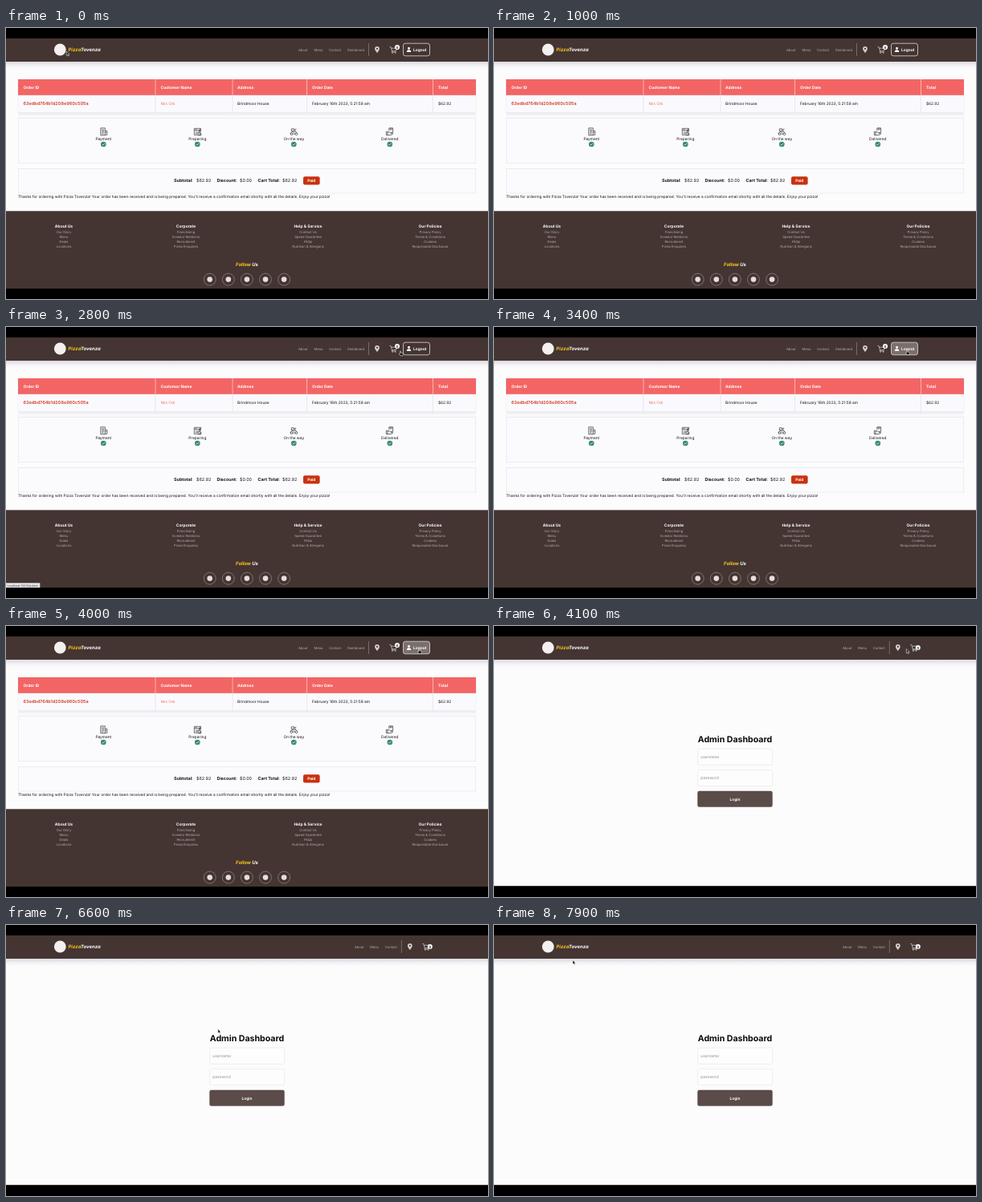
Recreate the animation shown at these times as an HTML page. Size 600 by 338 pixels, loop 8 s.

```html
<!DOCTYPE html>
<html lang="en">
<head>
<meta charset="utf-8">
<title>Order status</title>
<style>
html, body { margin: 0; width: 100%; height: 100%; overflow: hidden; background: #000; }
svg { display: block; width: 100vw; height: 100vh; }
text { font-family: Inter, Roboto, sans-serif; text-rendering: geometricPrecision; white-space: pre; }
</style>
</head>
<body>
<svg id="stage" viewBox="0 0 600 338">
  <defs>
    <linearGradient id="shade" x2="0" y2="1">
      <stop offset="0" stop-color="#cfcbd2" stop-opacity=".75"/>
      <stop offset=".45" stop-color="#e6e4ea" stop-opacity=".5"/>
      <stop offset="1" stop-color="#fcfcfd" stop-opacity="0"/>
    </linearGradient>
    <clipPath id="view"><rect y="13" width="600" height="312"/></clipPath>
  </defs>
  <g clip-path="url(#view)">
    <rect y="13" width="600" height="312" fill="#fcfcfd"/>
    <rect y="42" width="600" height="11" fill="url(#shade)"/>
    <rect y="12" width="600" height="30" fill="#443532"/>
    <g id="brand"></g>
    <g id="order"></g>
    <g id="login"></g>
    <g id="status"></g>
    <g id="cursor">
      <path id="arrow" d="M0 0V5.2L1.2 4.2 2 6 3 5.6 2.2 3.8H3.7Z" fill="#111" stroke="#fff" stroke-width=".55" stroke-linejoin="round"/>
      <path id="hand" d="M.2 .2Q.9-.3 1.3.4V2.2L3.7 2.8Q4.1 3 4 3.8L3.5 5.8H.6L-1 3.6Q-.8 2.8.2 3.4Z" fill="#111" stroke="#fff" stroke-width=".55" stroke-linejoin="round"/>
    </g>
  </g>
</svg>
<script>
const $ = id => document.getElementById(id);
const LOOP = 8000, SWITCH = 4100;
const BROWN = '#443532', YELLOW = '#fbc91b';

const text = (x, y, s, size = 4.8, fill = '#111', more = '') =>
  `<text x="${x}" y="${y}" font-size="${size}" fill="${fill}" ${more}>${s}</text>`;
const rect = (x, y, w, h, fill, more = '') =>
  `<rect x="${x}" y="${y}" width="${w}" height="${h}" fill="${fill}" ${more}/>`;
const dot = (x, y, r, fill, more = '') =>
  `<circle cx="${x}" cy="${y}" r="${r}" fill="${fill}" ${more}/>`;
const line = (d, stroke, width = .6, more = '') =>
  `<path d="${d}" fill="none" stroke="${stroke}" stroke-width="${width}" ${more}/>`;
const at = (x, y, s) => `<g transform="translate(${x} ${y})">${s}</g>`;
const MID = 'text-anchor="middle"';
const BOLD = 'font-weight="700"', LIGHT = 'font-weight="300"';
const SLANT = BOLD + ' font-style="italic"';
const duo = (a, b) => `<tspan fill="${YELLOW}">${a}</tspan>${b}`;

function nav(links, shift, badgeY) {
  const pin = '<path d="M0 4.2C-1.2 2-2.9.8-2.9-1.2A2.9 2.9 0 0 1 2.9-1.2C2.9.8 1.2 2 0 4.2Z" fill="#d5d0cf"/>' + dot(0, -1.2, 1.1, BROWN);
  const cart = line('M-4.5-3.5H-3L-1.4 1.8H3.3L4.2-1.8H-2.4M-1.4 1.8-1.8 3H3.4', '#ddd9d8', .7) +
    dot(-1, 4, .75, '#ddd9d8') + dot(2.7, 4, .75, '#ddd9d8');
  return links.map(([x, s]) => text(x, 28.6, s, 4.18, '#d8d2d0', LIGHT)).join('') +
    line(`M${451.5 + shift} 19V35`, '#8f8482', .7) +
    at(462 + shift, 27, pin) + at(482 + shift, 27, cart) +
    dot(487 + shift, badgeY, 3, '#fff') +
    text(487 + shift, badgeY + 1.5, '0', 4.2, '#222', MID + ' ' + BOLD);
}

const icons = [
  'M-3.5-4.5H2V4.5H-3.5ZM-2.2-2.5H.8M-2.2-.8H.8M-2.2 1H.8M-2.2 2.8H.2M2-1H4.5V4H2M2.5 1H4',
  'M-4-4H3.5V4H-4ZM-4-1.8H3.5M-2.5-3H-1M-2.5.5H.5M-2.5 2.3H-.5M4.5-4.5 1 1 .4 3 2 1.7 4.8-2.5M1 4.5H4.5V1.5',
  'M-4 2.8C-3.5 0-1.5-.2-.3 1L2-.5 1-3H3M2-.5 3.5 1.5M-3-.8H0V-3.5H-3ZM-1 2.8H2M4.6 2.8A1.4 1.4 0 1 1 1.8 2.8 1.4 1.4 0 1 1 4.6 2.8M-1.4 2.8A1.4 1.4 0 1 1-4.2 2.8 1.4 1.4 0 1 1-1.4 2.8',
  'M-1-1V-4.5H3.8V1H1M.5-4.5V-2.5H2.3V-4.5M-4.5 0H-2.8V4.2H-4.5ZM-2.8.5H-.5L1 2H3.5Q4.5 2.5 3.5 3.2L1 4.2H-2.8'
];

function step(x, label, i) {
  return at(x, 129.3, line(icons[i], '#222', .65)) + text(x, 139.7, label, 4.8, '#111', MID) +
    dot(x, 145, 3.3, '#1f7a5c') + dot(x, 145, 2.4, 'none', 'stroke="#a9d3c3" stroke-width=".4"') +
    line(`M${x - 1.4} 145L${x - .4} 146.1 ${x + 1.5} 143.8`, '#fff', .8);
}

const columns = [
  [21.5, 'Order ID', '63edbd764b1d208e960c505a', 5.5, '#d2391f', 'font-weight="600"'],
  [192.5, 'Customer Name', 'Nils Orb', 4.8, '#ee4b3a', LIGHT],
  [288, 'Address', 'Brindmoor House', 4.8],
  [381, 'Order Date', 'February 16th 2023, 5:21:58 am', 4.85],
  [538, 'Total', '$62.92', 4.8]
];
const footer = [
  ['About Us', 'Our Story', 'Menu', 'Deals', 'Locations'],
  ['Corporate', 'Franchising', 'Investor Relations', 'Recruitment', 'Press Enquiries'],
  ['Help &amp; Service', 'Contact Us', 'Speed Guarantee', 'FAQs', 'Nutrition &amp; Allergens'],
  ['Our Policies', 'Privacy Policy', 'Terms &amp; Conditions', 'Cookies', 'Responsible Disclosure']
];
const sums = [[209, 'Subtotal:'], [237, '$62.92'], [262.5, 'Discount:'], [291, '$0.00'], [313.5, 'Cart Total:'], [344, '$62.92']];
const frame = 'stroke="#e4e4f0" stroke-width=".7"';

$('brand').innerHTML = dot(67.3, 27, 7.4, '#f3f0ef') +
  text(77.5, 29.2, duo('Pizza', 'Tovenza'), 5.95, '#fff', SLANT);

$('order').innerHTML =
  nav([[364, 'About'], [383.5, 'Menu'], [402, 'Contact'], [425, 'Dashboard']], 0, 24) +
  rect(494.5, 19.2, 33, 15.6, 'none', 'id="logout" rx="2.6" stroke="#f2efee" stroke-width=".7"') +
  dot(501.5, 25.3, 1.5, '#fff') + '<path d="M498.8 29.9Q498.8 27.2 501.5 27.2T504.2 29.9Z" fill="#fff"/>' +
  text(507, 28.8, 'Logout', 4.8, '#fff', BOLD) +
  rect(15, 104, 570, 9, 'url(#shade)', 'opacity=".8"') +
  rect(15, 64, 570, 41.5, '#fafafe', 'stroke="#e6e4ee" stroke-width=".4"') +
  rect(15, 64, 570, 19.8, '#f36565') +
  [186, 282, 374.5, 531.5].map(x => line(`M${x} 64V83.8`, '#fbd3d3', .7) + line(`M${x} 83.8V105.5`, '#dddbe6', .6)).join('') +
  columns.map(([x, head, cell, size, fill, more]) =>
    text(x, 75.6, head, 4.95, '#fff', BOLD) + text(x, 96.4, cell, size, fill, more)).join('') +
  rect(15.3, 112.3, 569.4, 56.2, '#fbfbfe', frame) +
  [[121.3, 'Payment'], [238.3, 'Preparing'], [358.3, 'On the way'], [477.8, 'Delivered']]
    .map(([x, s], i) => step(x, s, i)).join('') +
  rect(15.3, 175.5, 569.4, 30.5, '#fbfbfe', frame) +
  sums.map(([x, s], i) => text(x, 192.3, s, 5.4, '#111', i % 2 ? '' : BOLD)).join('') +
  rect(370, 185.2, 20.6, 10.4, '#c9310f', 'rx="2"') +
  text(380.3, 192.2, 'Paid', 4.8, '#fff', MID + ' ' + BOLD) +
  text(15, 211.5, 'Thanks for ordering with Pizza Tovenza! Your order has been received and is being prepared. You\'ll receive a confirmation email shortly with all the details. Enjoy your pizza!', 4.78) +
  rect(0, 228.3, 600, 97, BROWN) +
  footer.map((col, i) => col.map((s, j) => j
    ? text(72 + 152 * i, 249.4 + 6.2 * j, s, 4.18, '#d5cfcd', MID + ' ' + LIGHT)
    : text(72 + 152 * i, 249, s, 4.95, '#fff', MID + ' ' + BOLD)).join('')).join('') +
  text(300, 297.4, duo('Follow', ' Us'), 5.95, '#fff', MID + ' ' + SLANT) +
  [0, 1, 2, 3, 4].map(i => dot(253.7 + 23.1 * i, 313.6, 7.5, 'none', 'stroke="#948a88" stroke-width=".7"') +
    dot(253.7 + 23.1 * i, 313.6, 3.3, '#e4dfde')).join('');

const field = (y, s) => rect(253.6, y, 93, 20.2, '#fdfdfe', 'rx="2" stroke="#e9e8ed" stroke-width=".7"') +
  text(257.3, y + 11.8, s, 4.85, '#8d8d92');
$('login').innerHTML =
  nav([[434, 'About'], [453, 'Menu'], [471.8, 'Contact']], 40.8, 27) +
  text(300, 144.8, 'Admin Dashboard', 10.6, '#0b0b0b', MID + ' ' + BOLD) +
  field(153.2, 'username') + field(179.5, 'password') +
  rect(253.3, 205.8, 93.4, 20, '#5b4c49', 'rx="2.4"') +
  text(300, 217.7, 'Login', 4.8, '#fff', MID + ' ' + BOLD) +
  rect(0, 324, 600, 1, BROWN);

$('status').innerHTML = rect(0, 319.3, 42.3, 6, '#e9e9ec') + text(1.5, 323.6, 'localhost:3000/admin', 3.75, '#444');

// Pointer stops: time, x, y
const stops = [
  [0, 75.3, 29], [100, 75.3, 29], [800, 440, 27], [960, 480, 5], [1300, 575, 5], [1800, 545, 24],
  [2300, 440, 26], [2800, 490.3, 30], [3300, 513.5, 28.8], [4800, 513.3, 28.5],
  [5500, 283.3, 111.8], [5700, 290, 130], [6200, 375, 266], [6650, 260, 125], [7150, 190, 88],
  [7250, 190, 88], [7600, 136, 58], [7700, 136, 58], [7900, 98, 43.8], [8000, 98, 43.8]
];
function pointer(t) {
  const i = Math.max(1, stops.findIndex(s => s[0] > t));
  const [t0, x0, y0] = stops[i - 1], [t1, x1, y1] = stops[i];
  const u = (t - t0) / (t1 - t0), e = u * u * (3 - 2 * u);
  return [x0 + (x1 - x0) * e, y0 + (y1 - y0) * e];
}

const show = (id, on) => $(id).setAttribute('visibility', on ? 'visible' : 'hidden');
function draw(t) {
  const [x, y] = pointer(t), admin = t >= SWITCH;
  const onButton = !admin && x > 494.5 && x < 527.5 && y > 19 && y < 35;
  const hand = onButton || (t >= 2200 && t < SWITCH);
  show('order', !admin);
  show('login', admin);
  show('status', t >= 2800 && t < 3200);
  show('arrow', !hand);
  show('hand', hand);
  $('logout').setAttribute('fill', onButton && t > 2800 ? '#7a6f6d' : 'none');
  $('cursor').setAttribute('transform', `translate(${x.toFixed(2)} ${y.toFixed(2)})`);
}

const start = performance.now();
function tick() {
  draw((performance.now() - start) % LOOP);
  requestAnimationFrame(tick);
}
draw(0);
tick();
</script>
</body>
</html>
```
